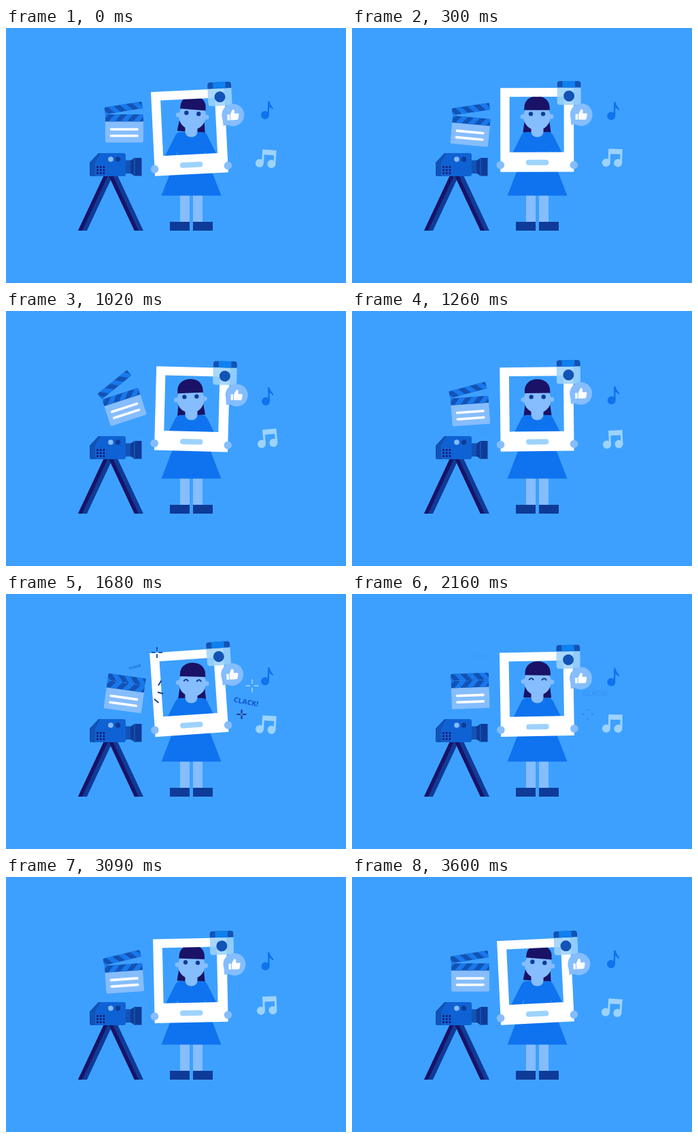
Recreate the animation shown at these times as an HTML page. Size 500 by 375 pixels, loop 3630 ms.

```html
<!DOCTYPE html>
<html lang="en">
<head>
<meta charset="utf-8">
<title>Photo booth</title>
<style>
  html, body { margin: 0; width: 100%; height: 100%; overflow: hidden; background: #3da0ff; }
  svg { display: block; width: 500px; height: 375px; }
  text { font-family: "Open Sans", Inter, sans-serif; font-weight: 800; text-anchor: middle; fill: #1460d0; }
  .sky { fill: #85bdff; }
  .dress { fill: #0f73ef; }
  .deep { fill: #0e3b97; }
  .mid { fill: #1253b5; }
  .night { fill: #1a1266; }
  .pale { fill: #9dd3fc; }
  .white { fill: #fff; }
  .line { fill: none; stroke-width: 2; stroke-linecap: butt; }
</style>
</head>
<body>
<svg viewBox="0 0 500 375">
  <defs>
    <clipPath id="armClip"><rect y="-10.5" width="56" height="10.5" rx="2"/></clipPath>
    <clipPath id="boardClip"><rect width="56" height="41.5" rx="2.5"/></clipPath>
    <clipPath id="camClip"><rect x="-17.5" y="-17.5" width="35" height="35" rx="4"/></clipPath>
  </defs>

  <!-- video camera -->
  <g>
    <path class="deep" d="M144 217H157L119 298H106Z"/>
    <path class="night" d="M144 217H150L112 298H106Z"/>
    <path class="deep" d="M151 217H164L202 298H189Z"/>
    <path class="night" d="M151 217H157L195 298H189Z"/>
    <path fill="#0f62d4" d="M136 184H173Q176 184 176 187V215Q176 218 173 218H126Q123 218 123 215V198Z"/>
    <path class="mid" d="M136 184H139L131 198V218H126Q123 218 123 215V198Z"/>
    <g id="dots" class="night"></g>
    <circle class="sky" cx="154" cy="193" r="3.8"/>
    <circle class="deep" cx="164.5" cy="193" r="3.8"/>
    <rect class="mid" x="176" y="194.500" width="8" height="19.500"/>
    <path class="deep" d="M183 195L189 191H199.500V217.500H189L183 213.500Z"/>
    <rect class="mid" x="188" y="191" width="2" height="26.500"/>
  </g>

  <!-- clapperboard -->
  <g id="board">
    <g clip-path="url(#boardClip)">
      <rect class="sky" width="56" height="42"/>
      <rect class="mid" width="56" height="10.500"/>
      <path id="lowStripes" fill="#1878ec"/>
    </g>
    <path d="M8.500 22H47M8.500 31.500H47" stroke="#fff" stroke-width="3.600" stroke-linecap="round"/>
    <g id="arm" clip-path="url(#armClip)">
      <rect class="mid" y="-10.500" width="56" height="10.500"/>
      <path id="topStripes" fill="#1878ec"/>
    </g>
  </g>

  <!-- girl -->
  <rect class="sky" x="256" y="240" width="14" height="47"/>
  <rect class="sky" x="275" y="240" width="14" height="47"/>
  <rect class="deep" x="241" y="285" width="29" height="13"/>
  <rect class="deep" x="275" y="285" width="29" height="13"/>
  <g id="hairBack"><path class="night" d="M-18.500 -8V8L-20.500 23.500H20.500L18.500 8V-8Z"/></g>
  <path class="dress" d="M253 183L250 157Q252 153 258 153H287Q293 153 295 157L292 183L316.500 246.500H228.500Z"/>
  <path class="dress" d="M258 153Q251.500 153.500 249 158L233 190H249L251.500 184L262 160ZM287 153Q293.500 153.500 296 158L312 190H296L293.500 184L283 160Z"/>
  <path class="sky" d="M263.500 146V152.500A9 8 0 0 0 281.500 152.500V146Z"/>
  <g id="head">
    <circle class="sky" cx="-21" r="3.400"/>
    <circle class="sky" cx="21" r="3.400"/>
    <circle class="sky" r="20"/>
    <path class="night" d="M-18.700 -9.500V-13C-18.700 -24 -10 -30 0 -30S18.700 -24 18.700 -13V-9.500Z"/>
    <g id="open" class="deep"><circle cx="-9" cy="-4" r="3.200"/><circle cx="9" cy="-4" r="3.200"/></g>
    <path id="shut" class="line" stroke="#153a93" d="M-13 -3.500H-5.500M5.500 -3.500H13"/>
    <path id="happy" class="line" stroke="#153a93" d="M-13 -2.300Q-9.500 -7.500 -6 -2.300M6 -2.300Q9.500 -7.500 13 -2.300"/>
  </g>

  <!-- picture frame, origin at the middle of its bottom edge -->
  <g id="frame">
    <path class="white" fill-rule="evenodd" d="M-54 -123.500H54V0H-54ZM-40.500 -110.500V-29H39.500V-110.500Z"/>
    <rect class="pale" x="-16.500" y="-17.800" width="33.500" height="8" rx="4"/>
    <circle class="sky" cx="-54" cy="-10" r="5.800"/>
    <circle class="sky" cx="54" cy="-10" r="5.800"/>
    <g transform="translate(47 -116)" clip-path="url(#camClip)">
      <rect class="pale" x="-18" y="-18" width="36" height="36" opacity=".87"/>
      <rect class="mid" x="-18" y="-18" width="36" height="10"/>
      <rect x="-9.500" y="-18" width="18.500" height="10" fill="#0f80f0"/>
      <circle class="mid" cy="4.500" r="8"/>
    </g>
    <g transform="translate(65 -84)">
      <circle class="sky" r="16.500"/>
      <path class="sky" d="M-15.500 5L-15 15L-6 14Z"/>
      <path class="white" d="M-8.500 -1H-5V7.300H-8.500ZM-4 -1L-.5 -8Q3.300 -8 2.300 -3.500L2 -2H7Q9 -2 8.700 0L7.500 6Q7 7.300 5.500 7.300H-4Z"/>
    </g>
  </g>

  <!-- notes -->
  <g id="single" class="dress">
    <circle r="6"/>
    <path d="M3.500 0V-20.500H6Q7 -15.500 12 -10L10.500 -8.500Q8 -11.500 6 -12V0Z"/>
  </g>
  <g id="double" class="pale">
    <circle cx="-9" cy="8" r="6"/>
    <circle cx="8.500" cy="8" r="6"/>
    <path d="M-6 8V-12.500H14.500V8H11.500V-5H-3V8Z"/>
  </g>

  <!-- clack -->
  <g id="burst"></g>
  <path id="rays" class="line" stroke="#153a93"/>
  <text id="big" font-size="10.300" y="3.700">CLACK!</text>
  <text id="small" font-size="5.200" y="1.900">CLACK!</text>
</svg>
<script>
const LOOP = 3630;
const $ = id => document.getElementById(id);
const NS = 'http://www.w3.org/2000/svg';
const clamp = x => Math.max(0, Math.min(1, x));
const smooth = x => (x = clamp(x), x * x * (3 - 2 * x));
const easeOut = x => 1 - (1 - clamp(x)) ** 3;
const mix = (a, b, p) => a + (b - a) * p;

function add(parent, tag, attrs) {
  const el = document.createElementNS(NS, tag);
  for (const k in attrs) el.setAttribute(k, attrs[k]);
  return parent.appendChild(el);
}
function place(id, x, y, turn = 0, scale = 1) {
  $(id).setAttribute('transform', `translate(${x} ${y}) rotate(${turn}) scale(${scale})`);
}
const show = (id, on) => $(id).setAttribute('opacity', Number(on));

// Periodic curve through rows of [time, ...values], flat at every peak
function track(rows) {
  const n = rows.length;
  const key = i => {
    const lap = Math.floor(i / n), row = rows[i - lap * n];
    return [row[0] + lap * LOOP, ...row.slice(1)];
  };
  const rate = (i, k) => {
    const a = key(i), b = key(i + 1);
    return (b[k] - a[k]) / (b[0] - a[0]);
  };
  const slope = (i, k) => {
    const p = rate(i - 1, k), q = rate(i, k);
    return p * q <= 0 ? 0 : 2 * p * q / (p + q);
  };
  return t => {
    let i = n - 1;
    while (rows[i][0] > t) i--;
    const a = key(i), b = key(i + 1), h = b[0] - a[0], u = (t - a[0]) / h;
    return a.slice(1).map((v, j) => {
      const k = j + 1;
      return mix(v, b[k], smooth(u)) + h * u * (1 - u) * ((1 - u) * slope(i, k) - u * slope(i + 1, k));
    });
  };
}

// x, y, turn
const framePose = track([
  [0, 273, 215, -2.8], [630, 271.5, 207, 3], [1020, 272, 206, 1.5],
  [1680, 273.5, 206.5, -3.9], [2160, 273, 209, -1], [2640, 272.5, 212, 0]
]);
const headPose = track([
  [0, 274, 129.5, 4.5], [630, 269.7, 131.3, -5], [1020, 271.5, 130, -2.5],
  [1680, 274.2, 131, 1.5], [2160, 273, 129, 1], [2640, 272, 130, 0]
]);
// y, turn, arm angle
const boardPose = track([
  [0, 147.5, 0, -9], [630, 156, 10, -20], [1020, 140.8, -18, -21], [1110, 140.5, -18.5, -22],
  [1410, 153, 10, 0], [1680, 151, 8, 0], [2160, 147.5, -2, 0], [2640, 149.7, -5.5, -10]
]);

const stars = [
  { x: 222, y: 86, r: 8, color: '#1455b8', from: 1470, life: 560 },
  { x: 362, y: 135, r: 9.5, color: '#8fcaff', from: 1470, life: 560 },
  { x: 346.5, y: 177, r: 7.5, color: '#1a2f86', from: 1520, life: 680 }
];
// x, y and direction of each ray
const rays = [[224, 134.5, -58], [223, 144.5, 14], [218, 154.5, 40]];

for (let i = 0; i < 9; i++)
  add($('dots'), 'circle', { cx: 134.5 + i % 3 * 4.7, cy: 204.5 + Math.floor(i / 3) * 4.5, r: 1.4 });
const stripes = draw => [5, 23, 41, -13].map(draw).join('');
$('topStripes').setAttribute('d', stripes(x => `M${x} -10.5h9l9 10.5h-9z`));
$('lowStripes').setAttribute('d', stripes(x => `M${x + 9} 0h9l-9 10.5h-9z`));
for (const s of stars)
  s.el = add($('burst'), 'path', { class: 'line', stroke: s.color, transform: `translate(${s.x} ${s.y})` });

function drawStar(s, t) {
  const q = (t - s.from) / s.life;
  const far = s.r * easeOut(q / .42), near = Math.min(far, s.r * mix(.15, .8, smooth((q - .1) / .9)));
  s.el.setAttribute('opacity', q > 0 && q < 1 ? 1 - .75 * clamp((q - .6) / .4) : 0);
  s.el.setAttribute('d', `M0 ${-far}V${-near}M0 ${near}V${far}M${-far} 0H${-near}M${near} 0H${far}`);
}

function drawRays(t) {
  const q = (t - 1440) / 560, head = 8.5 * easeOut(q / .4), tail = 8.5 * smooth((q - .45) / .55);
  $('rays').setAttribute('d', rays.map(([x, y, a]) => {
    const c = Math.cos(a * Math.PI / 180), s = Math.sin(a * Math.PI / 180);
    return `M${x + c * tail} ${y + s * tail}L${x + c * head} ${y + s * head}`;
  }).join(''));
  show('rays', q > 0 && q < 1);
}

function drawText(t) {
  const p = (t - 1680) / 480, live = t > 1440 && t < 2220;
  const pop = easeOut((t - 1440) / 200);
  const fade = 1 - smooth((t - 1800) / 410);
  place('big', mix(353, 357.5, p), mix(158.5, 146, p), mix(11, 0, p), pop);
  place('small', mix(189.5, 189, p), mix(107, 91, p), mix(-13, 0, p), pop);
  show('big', live ? mix(.1, 1, fade) : 0);
  show('small', live ? .8 * mix(.08, 1, fade) : 0);
}

function render(t) {
  place('frame', ...framePose(t));
  const head = headPose(t);
  place('head', ...head);
  place('hairBack', ...head);

  const [y, turn, arm] = boardPose(t);
  $('board').setAttribute('transform', `translate(174 ${y}) rotate(${turn}) translate(-28 -20.5)`);
  $('arm').setAttribute('transform', `rotate(${arm})`);

  const shut = t >= 570 && t < 690, happy = t >= 1410 && t < 2370;
  show('shut', shut);
  show('happy', happy);
  show('open', !shut && !happy);

  // Notes sway twice per loop
  const sway = Math.cos(t / LOOP * 4 * Math.PI);
  place('single', 381.5 - .6 * sway, 130.5 - 2.5 * sway, 2 * sway);
  place('double', 383.3 - .9 * sway, 189 + 2.5 * sway, -1 + 5 * sway);

  stars.forEach(s => drawStar(s, t));
  drawRays(t);
  drawText(t);
}

const start = performance.now();
function tick(now) {
  render(Math.max(0, now - start) % LOOP);
  requestAnimationFrame(tick);
}
render(0);
requestAnimationFrame(tick);
</script>
</body>
</html>
```
